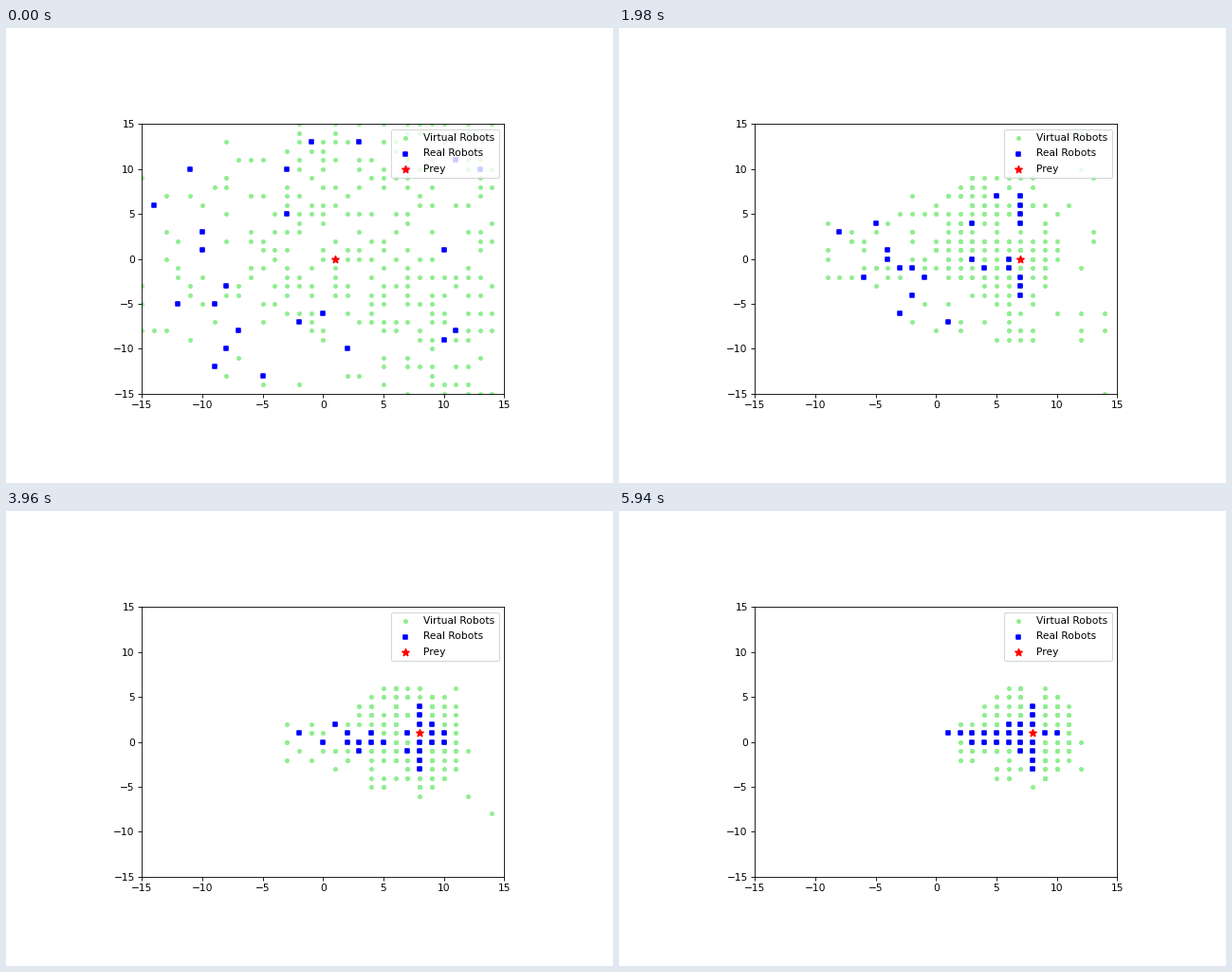
A matplotlib script that plays this animation: 640x480 px, repeating every 7930 ms.

```python
import numpy as np
import matplotlib.pyplot as plt
from matplotlib.animation import FuncAnimation

LOOP_MS, INTERVAL, STEP_MS, LAST_STEP = 7930, 65, 330, 18
SCALE = 0.77  # the whole plot is drawn a little smaller than usual

# Where the hunting robots start; everything later follows from the chase.
START = [(-14, 6), (-11, 10), (-10, 3), (-10, 1), (-12, -5), (-9, -5),
         (-8, -3), (-7, -8), (-8, -10), (-9, -12), (-5, -13), (-3, 10),
         (-1, 13), (3, 13), (-3, 5), (-2, -7), (0, -6), (2, -10),
         (10, 1), (10, -9), (11, -8), (11, 11), (13, 10), (7, 10)]


def prey_at(step):
    """Runs right, turns back in front of the edge, then right again."""
    x = np.interp(step, [0, 9, 10, 14, 18], [1, 10, 10, 6, 8])
    return int(x + 1e-9), int(step >= 10)


def cell(pos):
    return tuple(int(v) for v in np.round(pos))


def step_toward(gap):
    """One cell sideways; the climb follows the slope to the prey."""
    dx, dy = np.abs(gap)
    climb = min(1, dy, 2 * dy / max(dx, 1))
    return np.sign(gap) * (min(dx, 1), climb)


def hunt():
    """Robots close in, the nearest first, and never share a cell."""
    robots = np.array(START, float)
    history = [np.round(robots)]
    for step in range(1, LAST_STEP + 1):
        prey = prey_at(step)
        for robot in robots:
            if cell(robot) == prey:
                robot[:] = prey_at(step - 1)
        taken = {cell(r) for r in robots} | {prey}
        for i in np.argsort(np.hypot(*(robots - prey).T), kind="stable"):
            taken.discard(cell(robots[i]))
            move = step_toward(prey - robots[i])
            for part in ((1, 1), (1, 0), (0, 1)):
                goal = robots[i] + move * part
                if cell(goal) not in taken | {prey}:
                    robots[i] = goal
                    break
            taken.add(cell(robots[i]))
        history.append(np.round(robots))
    return history


def start_density(x, y):
    if x < -8:
        return 0.14 if abs(y) < 10 else 0.0
    if x < 5 and y < -8 or x < -3 and y > 8:
        return 0.08
    if x < 5:
        return 0.38
    return 0.48 if x < 10 else 0.34


def swarm():
    """Virtual robots shrink into a disc that trails the prey."""
    rng = np.random.default_rng(12)
    pos = np.array([(x, y) for x in range(-15, 15) for y in range(-15, 16)
                    if rng.random() < start_density(x, y)])
    u, v = (pos / 15).T
    disc = np.column_stack([u * np.sqrt(1 - v ** 2 / 2),
                            v * np.sqrt(1 - u ** 2 / 2)])
    disc += rng.normal(0, 0.1, disc.shape)
    waits = (pos[:, 0] > 10) & (rng.random(len(pos)) < 0.35)
    leave = np.where(waits, rng.integers(7, 15, len(pos)), LAST_STEP + 1)
    history = [pos]
    for step in range(1, LAST_STEP + 1):
        center = (np.interp(step, [0, 6, 10, 14, 18], [3, 3.2, 6.3, 6, 7]),
                  np.interp(step, [0, 6, 10, 18], [1, 0.8, 0, 0.5]))
        size = np.interp(step, [0, 6, 10, 14, 18], [9, 7.3, 6, 5.3, 5])
        goal = np.round(center + size * disc).astype(int)
        pos = pos + np.sign(goal - pos) * ~waits[:, None]
        history.append(pos)
    return [p[leave > step] for step, p in enumerate(history)]


plt.rcParams.update({
    "font.family": "DejaVu Sans",
    "font.size": 10 * SCALE,
    "axes.linewidth": 0.8 * SCALE,
    "patch.linewidth": 1.0 * SCALE,
})
for axis in ("xtick", "ytick"):
    plt.rcParams.update({
        f"{axis}.major.size": 3.5 * SCALE,
        f"{axis}.major.width": 0.8 * SCALE,
        f"{axis}.major.pad": 3.5 * SCALE,
    })

fig = plt.figure(figsize=(6.4, 4.8), dpi=100)
ax = fig.add_axes([143.3 / 640, 94.1 / 480, 0.775 * SCALE, 0.77 * SCALE])
ax.set(xlim=(-15, 15), ylim=(-15, 15))
ax.set_xticks(range(-15, 16, 5))
ax.set_yticks(range(-15, 16, 5))


def markers(color, shape, area, label):
    return ax.scatter([], [], s=area * SCALE ** 2, c=color, marker=shape,
                      linewidths=1.5 * SCALE, label=label)


virtual = markers("lightgreen", "o", 10, "Virtual Robots")
real = markers("blue", "s", 20, "Real Robots")
prey_mark = markers("red", "*", 50, "Prey")
ax.legend(loc="upper right", labelspacing=0.6)

ROBOTS, SWARM = hunt(), swarm()


def draw(frame):
    step = min((frame * INTERVAL + INTERVAL - 1) // STEP_MS, LAST_STEP)
    virtual.set_offsets(SWARM[step])
    real.set_offsets(ROBOTS[step])
    prey_mark.set_offsets([prey_at(step)])
    return virtual, real, prey_mark


anim = FuncAnimation(fig, draw, frames=LOOP_MS // INTERVAL, interval=INTERVAL,
                     repeat=True, repeat_delay=0, blit=False)
plt.show()
```
